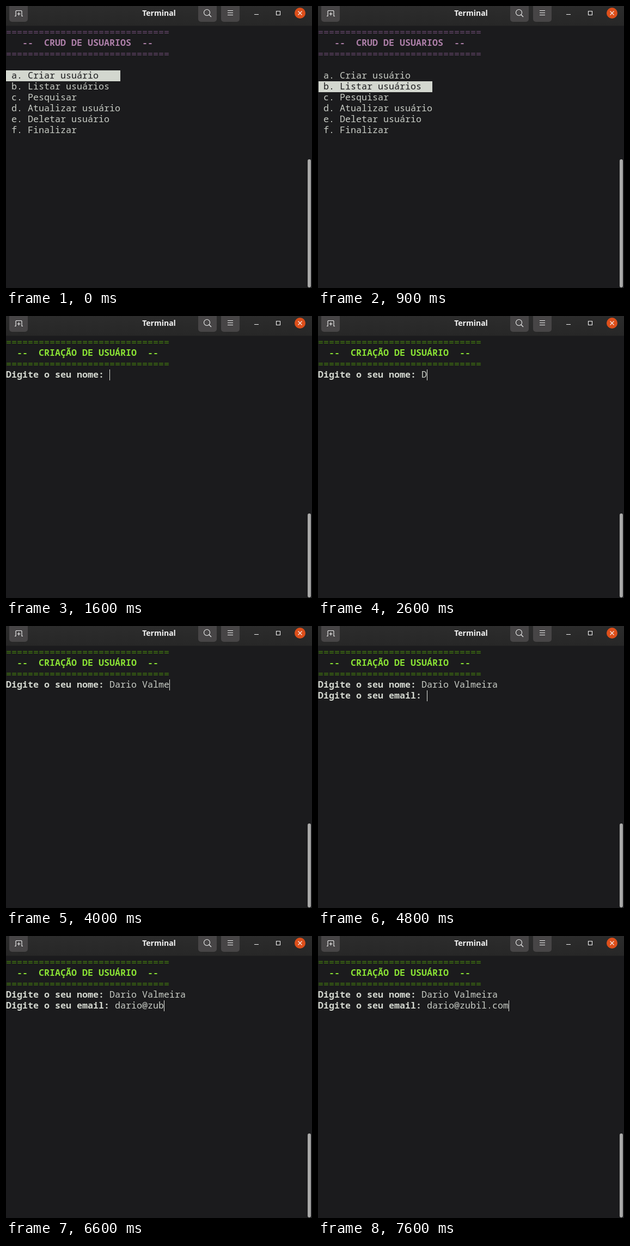
Write an HTML page with a canvas that moves like this. It is 562 px wide and 517 px high and loops after 8000 ms.

```html
<!DOCTYPE html>
<html lang="pt">
<head>
<meta charset="utf-8">
<title>Terminal</title>
<style>
html, body { margin: 0; width: 100%; height: 100%; overflow: hidden; background: #1b1b1d; }
canvas { display: block; width: 562px; height: 517px; }
</style>
</head>
<body>
<canvas id="stage"></canvas>
<script>
const W = 562, H = 517, LOOP = 8000;
const CELL = 10, ROW = 20, TOP = 38;
const KEY = 66, REPAINT = 100; // ms between keystrokes and between screen updates
const BG = '#1b1b1d', FG = '#d3d7cf', TEXT = '#c9cdc6', ICON = '#f2f2f2';
const MONO = '16.667px "Noto Sans Mono", "DejaVu Sans Mono", monospace';
const MENU = ['a. Criar usuário', 'b. Listar usuários', 'c. Pesquisar',
  'd. Atualizar usuário', 'e. Deletar usuário', 'f. Finalizar'];

// Typing comes in bursts, each keyed by its start time
const NAME = {
  prompt: 'Digite o seu nome: ', start: 1600,
  bursts: { 2600: 'D', 2800: 'ario', 3200: ' ', 3500: 'Va', 3800: 'lme', 4200: 'ira' }
};
const EMAIL = {
  prompt: 'Digite o seu email: ', start: 4800,
  bursts: { 5500: 'd', 5700: 'ario', 6200: '@', 6400: 'zub', 6800: 'il', 7200: '.co', 7600: 'm' }
};

const canvas = document.getElementById('stage');
const ctx = canvas.getContext('2d');
const ratio = window.devicePixelRatio || 1;
canvas.width = W * ratio;
canvas.height = H * ratio;
ctx.scale(ratio, ratio);

function box(x, y, w, h, color, radius = 0) {
  ctx.fillStyle = color;
  ctx.beginPath();
  ctx.roundRect(x, y, w, h, radius);
  ctx.fill();
}

function stroke(path, width = 1.1) {
  ctx.strokeStyle = ICON;
  ctx.lineWidth = width;
  ctx.stroke(new Path2D(path));
}

// Terminal text: one glyph per grid cell
function print(text, col, row, color, bold) {
  ctx.font = (bold ? 'bold ' : '') + MONO;
  ctx.textAlign = 'left';
  ctx.fillStyle = color;
  [...text].forEach((ch, i) => {
    if (ch !== ' ') ctx.fillText(ch, (col + i) * CELL, TOP + row * ROW + 15);
  });
}

function heading(text, col, dim, bright) {
  const rule = '='.repeat(30);
  print(rule, 0, 0.05, dim);
  print(`--  ${text}  --`, col, 1, bright, true);
  print(rule, 0, 2.05, dim);
}

function header() {
  const shade = ctx.createLinearGradient(0, 0, 0, 36);
  shade.addColorStop(0, '#2c2c2c');
  shade.addColorStop(1, '#272727');
  box(0, 0, W, 37, shade);
  box(0, 36, W, 1, '#1f1f1f');
  for (const x of [6, 353, 395]) box(x, -4, 34, 33, '#474546', 5);

  stroke('M16 18.5h2v-9l1-1h9l1 1v9h2M20.5 14.5h6M23.5 11.5v6'); // new tab
  stroke('M374.5 12a5.5 5.5 0 1 0-11 0a5.5 5.5 0 1 0 11 0M373 16l4 4'); // search
  stroke('M407 8.5h10m-10 4h10m-10 4h10'); // menu

  ctx.font = 'bold 14px "Open Sans", "Noto Sans", sans-serif';
  ctx.textAlign = 'center';
  ctx.fillStyle = '#f4f4f4';
  ctx.fillText('Terminal', 281, 18);

  stroke('M456 15.5h8M496.5 9.5h7v7h-7z'); // minimise, maximise
  box(530, 3, 20, 20, '#dd4f1b', 10);
  stroke('M536.5 9.5l7 7m0-7l-7 7', 1.2);
}

function menu(t) {
  heading('CRUD DE USUARIOS', 3, '#6a4a70', '#ad7fa8');
  const chosen = t >= 900 && t < 1100 ? 1 : 0;
  const left = t < 300 ? 0 : 1;
  MENU.forEach((label, i) => {
    const on = i === chosen;
    if (on) box(left, TOP + (4 + i) * ROW, 210 - left, ROW, FG);
    print(label, 1, 4 + i, on ? BG : TEXT);
  });
}

function typed(bursts, t) {
  const now = Math.floor(t / REPAINT) * REPAINT;
  return Object.entries(bursts).map(([at, text]) =>
    text.slice(0, Math.max(0, 1 + Math.floor((now - at) / KEY)))).join('');
}

function field({ prompt, bursts }, row, t, active) {
  const value = typed(bursts, t);
  print(prompt, 0, row, FG, true);
  print(value, prompt.length, row, TEXT);
  if (active) box((prompt.length + value.length) * CELL, TOP + row * ROW, 1, ROW, '#e4e6e1');
}

function form(t) {
  heading('CRIAÇÃO DE USUÁRIO', 2, '#46800f', '#8ae234');
  const second = t >= EMAIL.start;
  field(NAME, 3, t, !second);
  if (second) field(EMAIL, 4, t, true);
}

function draw(t) {
  box(0, 0, W, H, BG);
  header();
  const inForm = t >= NAME.start;
  (inForm ? form : menu)(t);
  const y = inForm ? 362 : 281;
  box(554, y, 6, 516 - y, '#a9a9a8', 3);
}

const origin = performance.now();
function frame() {
  draw((performance.now() - origin) % LOOP);
  requestAnimationFrame(frame);
}
frame();
</script>
</body>
</html>
```
